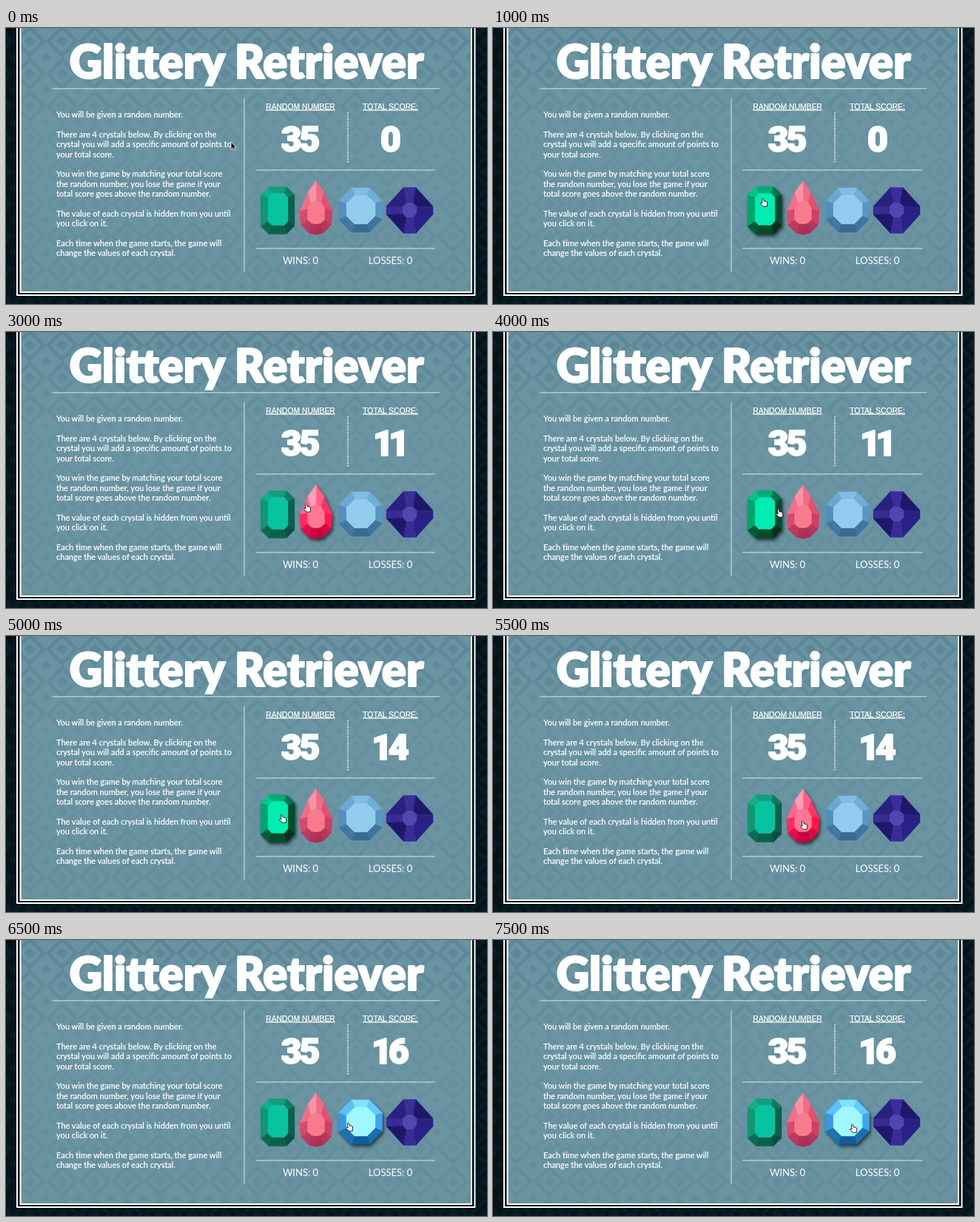
Recreate the animation shown at these times as an HTML page. Size 650 by 373 pixels, loop 8 s.

```html
<!DOCTYPE html>
<html lang="en">
<head>
<meta charset="utf-8">
<title>Glittery Retriever</title>
<style>
html, body { margin: 0; width: 100%; height: 100%; overflow: hidden; background: #05141a; }
svg { display: block; width: 650px; height: 373px; }
text { fill: #fff; font-family: Lato, "Open Sans", sans-serif; }
.round { font-weight: 900; text-anchor: middle; stroke: #fff; stroke-width: 2; stroke-linejoin: round; }
.title { font-size: 61.5px; }
.number { font-family: Roboto, "Open Sans", sans-serif; font-size: 48px; font-weight: 800; letter-spacing: -3px; font-variant-numeric: proportional-nums; }
.label { font: 10.35px "Liberation Sans", Arial, sans-serif; text-anchor: middle; text-decoration: underline; stroke: #fff; stroke-width: .25; }
.body { font-size: 10.97px; font-weight: 500; stroke: #fff; stroke-width: .15; }
.tally { font-size: 13px; text-anchor: middle; }
.rule { stroke: #dbe6ea; stroke-width: 1; fill: none; }
.hot { filter: contrast(1.6) drop-shadow(2px 3px 2px rgba(0, 0, 0, .6)); }
</style>
</head>
<body>
<svg id="stage" viewBox="0 0 650 373" xmlns="http://www.w3.org/2000/svg">
  <defs>
    <pattern id="weave" width="44" height="44" patternUnits="userSpaceOnUse" x="10" y="-4">
      <path d="M22 3L41 22L22 41L3 22Z" fill="none" stroke="#0d3745" stroke-width="5"/>
      <path d="M22 14L30 22L22 30L14 22Z" fill="#0d3745"/>
      <path d="M0 -6L6 0L0 6L-6 0ZM44 -6L50 0L44 6L38 0ZM0 38L6 44L0 50L-6 44ZM44 38L50 44L44 50L38 44Z" fill="#0d3745"/>
    </pattern>
    <linearGradient id="panel" x2="0" y2="1">
      <stop stop-color="#6893a2"/>
      <stop offset=".4" stop-color="#6c95a3"/>
      <stop offset="1" stop-color="#6a93a2"/>
    </linearGradient>
    <linearGradient id="fade" x2="0" y2="1">
      <stop stop-color="#fff"/>
      <stop offset=".4" stop-color="#444"/>
      <stop offset="1" stop-color="#777"/>
    </linearGradient>
    <mask id="soften"><rect width="650" height="373" fill="url(#fade)"/></mask>
  </defs>

  <rect width="650" height="373" fill="#05141a"/>
  <rect width="650" height="373" fill="url(#weave)" opacity=".22"/>
  <path d="M14 -5H634.5V362H14Z" fill="#fff"/>
  <path d="M16 -5H632.5V360H16Z" fill="#030708"/>
  <path d="M18.5 -5H630V358H18.5Z" fill="#fff"/>
  <path d="M20.5 -5H628V356H20.5Z" fill="url(#panel)"/>
  <path d="M20.5 -5H628V356H20.5Z" fill="url(#weave)" opacity=".13" mask="url(#soften)"/>

  <text class="round title" x="325" y="68">Glittery Retriever</text>
  <path class="rule" d="M63 82H586M322 95V330M337 192H580M337 298H580"/>
  <path d="M462 114V183" stroke="#fff" stroke-width="1.5" stroke-dasharray="1.5 1.5"/>

  <g id="rules"></g>
  <text class="label" x="398" y="109.5">RANDOM NUMBER</text>
  <text class="label" x="519.5" y="109.5">TOTAL SCORE:</text>
  <text class="round number" x="396.5" y="167">35</text>
  <text class="round number" x="518.5" y="167" id="score">0</text>
  <text class="tally" x="398" y="319">WINS: 0</text>
  <text class="tally" x="519.5" y="319">LOSSES: 0</text>

  <g id="gems"></g>
  <path id="arrow" d="M0 0V10L2.4 8L4 11.4L5.8 10.6L4.3 7.3H7.3Z" fill="#111" stroke="#fff" stroke-width=".8"/>
  <path id="hand" d="M-2.6 -5.3Q-1.5 -6.6 -.6 -5.2L.4 -1.8L1.8 -2.1L3.2 -1.5L4.4 -.8Q5 2.2 4.2 5.2H-.8L-4.2 1.5Q-4.6 -.2 -3.2 .1L-1.9 1Z" fill="#fff" stroke="#111" stroke-width=".9" stroke-linejoin="round"/>
</svg>
<script>
const NS = "http://www.w3.org/2000/svg";
const el = id => document.getElementById(id);

function add(parent, tag, attrs = {}, text = "") {
  const node = document.createElementNS(NS, tag);
  for (const key in attrs) node.setAttribute(key, attrs[key]);
  node.textContent = text;
  return parent.appendChild(node);
}

const lines = [
  "You will be given a random number.", "",
  "There are 4 crystals below. By clicking on the",
  "crystal you will add a specific amount of points to",
  "your total score.", "",
  "You win the game by matching your total score",
  "the random number, you lose the game if your",
  "total score goes above the random number.", "",
  "The value of each crystal is hidden from you until",
  "you click on it.", "",
  "Each time when the game starts, the game will",
  "change the values of each crystal."
];
lines.forEach((line, i) => {
  if (line) add(el("rules"), "text", { class: "body", x: 68, y: 121.3 + i * 13.35 }, line);
});

// Clockwise octagon from the top edge: half sizes, then half lengths of the flat sides.
const octagon = (cx, cy, w, h, fx, fy) => [
  [-fx, -h], [fx, -h], [w, -fy], [w, fy], [fx, h], [-fx, h], [-w, fy], [-w, -fy]
].map(([x, y]) => [cx + x, cy + y]);

// Clockwise closed outline from its right half, top to bottom.
const mirror = (cx, half) => [
  ...half.map(([x, y]) => [cx + x, y]),
  ...half.slice(1, -1).reverse().map(([x, y]) => [cx - x, y])
];

// A flat table surrounded by one facet per edge.
function gem(outer, inner, table, shades) {
  const group = add(el("gems"), "g");
  const face = (points, fill) => add(group, "polygon", {
    points: points.join(" "), fill, stroke: fill, "stroke-width": .4, "stroke-linejoin": "round"
  });
  outer.forEach((p, i) => {
    const j = (i + 1) % outer.length;
    face([p, outer[j], inner[j], inner[i]], shades[i]);
  });
  face(inner, table);
  return group;
}

const gems = {
  green: gem(octagon(367, 246.5, 23, 32, 12, 21), octagon(367.5, 245, 13.5, 21.5, 8.5, 16), "#08c39f",
    ["#149c7b", "#107a60", "#0d5f4b", "#0b4f3e", "#0c5f49", "#0f6a53", "#129674", "#17ab87"]),
  red: gem(
    mirror(419, [[0, 206.5], [11, 222], [22, 247], [20.5, 266], [10, 277], [0, 279.5]]),
    mirror(419, [[0, 234], [7, 236], [11.5, 244], [11.5, 259], [6, 264], [0, 265]]),
    "#fa7a8d",
    ["#ee6c84", "#e5506f", "#d23e61", "#b8355a", "#a93255", "#b0335a", "#bf385f", "#d84a6c", "#f0708a", "#fa92a2"]),
  blue: gem(octagon(479, 246, 29.5, 30, 12.5, 12.5), octagon(479.5, 245.5, 19.5, 19.5, 8.5, 8.5), "#93cbef",
    ["#7fbde5", "#6cafd9", "#5897c4", "#40759d", "#3a6a90", "#42779e", "#528fbb", "#68a8d4"]),
  violet: gem(octagon(545.5, 246.5, 31.5, 31, 8.5, 5.5), octagon(545.5, 246, 9.5, 9.5, 4.5, 4.5), "#5145ae",
    ["#3a2e98", "#1f176c", "#2a2083", "#2a2085", "#382c96", "#1f176c", "#382c96", "#292080"])
};

// start ms, pointer x, pointer y, hovered gem, score
const steps = [
  [0, 304, 154, null, 0],
  [500, 328, 190, null, 0],
  [1000, 366, 236, "green", 0],
  [1500, 368, 237, "green", 3],
  [2500, 405, 238, "red", 3],
  [3000, 407, 238, "red", 11],
  [4000, 387, 245, "green", 11],
  [4500, 374, 247, "green", 14],
  [5500, 420, 256, "red", 14],
  [6000, 461, 254, "blue", 14],
  [6500, 464, 253, "blue", 16],
  [7500, 487, 255, "blue", 16]
];
const LOOP = 8000;
const start = performance.now();
let shown = null;

function draw(now) {
  const time = Math.max(0, now - start) % LOOP;
  const step = steps.findLast(s => s[0] <= time);
  if (step !== shown) {
    const [, x, y, hovered, score] = shown = step;
    for (const name in gems) gems[name].classList.toggle("hot", name === hovered);
    el("score").textContent = score;
    for (const [id, visible] of [["arrow", !hovered], ["hand", hovered]]) {
      el(id).setAttribute("transform", `translate(${x} ${y})`);
      el(id).style.display = visible ? "" : "none";
    }
  }
  requestAnimationFrame(draw);
}
draw(start);
</script>
</body>
</html>
```
